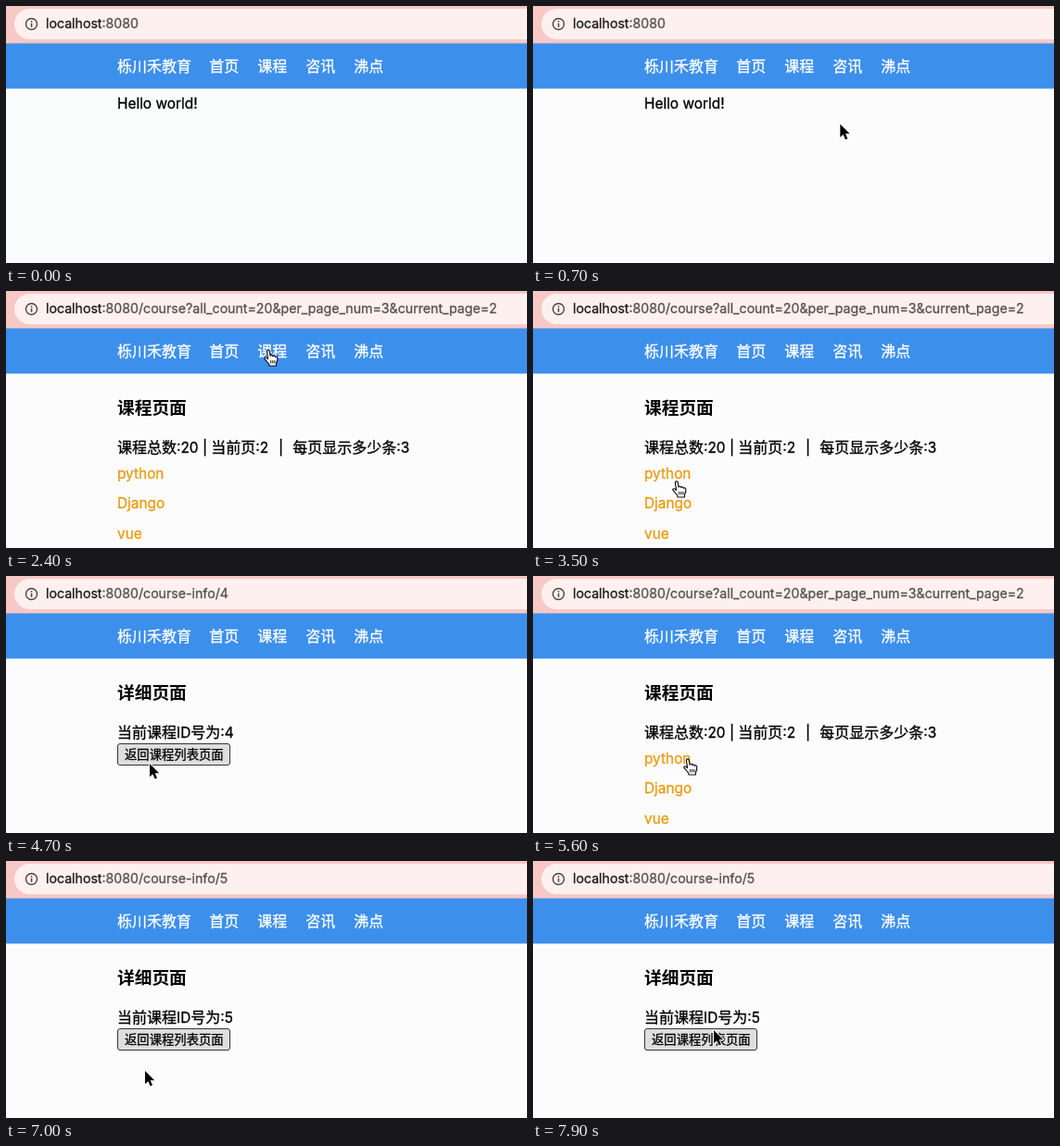
An HTML page with a canvas that plays this animation: 562x278 px, repeating every 8 s.

```html
<!DOCTYPE html>
<html lang="zh-CN">
<head>
<meta charset="utf-8">
<title>Router demo</title>
<style>
  html, body { margin: 0; width: 100%; height: 100%; overflow: hidden; background: #fcfcfc; }
  canvas { display: block; width: 562px; height: 278px; }
</style>
</head>
<body>
<canvas id="stage"></canvas>
<script>
const W = 562, H = 278, LOOP = 8000;
const LATIN = 'Inter, "Noto Sans CJK SC", "Noto Sans CJK", sans-serif';
const HAN = '"Noto Sans CJK SC", "Noto Sans CJK", sans-serif';
const LINK = '#ec9a10';

const canvas = document.getElementById('stage');
const ctx = canvas.getContext('2d');
const ratio = window.devicePixelRatio || 1;
canvas.width = W * ratio;
canvas.height = H * ratio;

// start time, page, path shown after the host
const pages = [
  [0, 'home', ''],
  [1900, 'list', '/course?all_count=20&per_page_num=3&current_page=2'],
  [3700, 'info', '/course-info/4'],
  [5500, 'list', '/course?all_count=20&per_page_num=3&current_page=2'],
  [6700, 'info', '/course-info/5']
];

// pointer tip: time, x, y
const track = [
  [300, 422, 237], [900, 300, 90], [1200, 283, 64], [2500, 283, 64],
  [3100, 163, 211], [3400, 155, 206], [3700, 155, 206], [4000, 155, 203],
  [5000, 155, 203], [5350, 167, 198], [6250, 167, 198], [6600, 150, 227],
  [7100, 150, 227], [7700, 195, 183], [8000, 195, 183]
];

const arrow = new Path2D('M0 0V14.2L3.3 11.2L5.6 16.6L8 15.6L5.7 10.3H10.2Z');
const hand = new Path2D(
  'M-1.6 1.2C-1.6 -.6 1 -.6 1.3 1.1L2.1 6.2C2.6 4.8 4.5 5 4.8 6.6' +
  'C5.5 5.5 7.2 5.9 7.4 7.3C8.4 6.4 9.7 7 9.8 8.4C10 11 9.6 12.6 8.6 14' +
  'L8.4 17H1.2L.7 15.2C-.8 13.6 -1.8 11.6 -3.8 9.7C-5 8.4 -3.6 7.2 -2.2 8.1L-.4 9.6Z');
const creases = new Path2D('M2.7 11V14.4M4.8 11V14.4M6.9 11V14.4');

// A hairline outline gives regular type its medium weight.
function text(str, x, y, color, size, font, weight = 400) {
  ctx.font = `${weight} ${size}px ${font}`;
  ctx.fillStyle = ctx.strokeStyle = color;
  ctx.fillText(str, x, y);
  if (weight === 400) {
    ctx.lineWidth = 0.3;
    ctx.lineJoin = 'round';
    ctx.strokeText(str, x, y);
  }
  return x + ctx.measureText(str).width;
}
const latin = (str, x, y, color = '#000') => text(str, x, y, color, 15.4, LATIN);
const han = (str, x, y, color = '#000') => text(str, x, y, color, 16, HAN);
const heading = str => text(str, 120, 133, '#000', 18.72, HAN, 700);

function box(x, y, w, h, r, fill, stroke) {
  ctx.beginPath();
  ctx.roundRect(x, y, w, h, r);
  ctx.fillStyle = fill;
  ctx.fill();
  if (stroke) {
    ctx.strokeStyle = stroke;
    ctx.lineWidth = 1;
    ctx.stroke();
  }
}

function drawChrome(path) {
  ctx.fillStyle = '#f7c8c5';
  ctx.fillRect(0, 0, W, 41);
  box(9, 3, W + 40, 33, 16.5, '#fdf0ee');

  ctx.strokeStyle = ctx.fillStyle = '#4a4444';
  ctx.lineWidth = 1.4;
  ctx.beginPath();
  ctx.arc(27.5, 19.5, 6, 0, Math.PI * 2);
  ctx.stroke();
  ctx.fillRect(26.8, 18.6, 1.5, 4.2);
  ctx.fillRect(26.8, 16, 1.5, 1.5);

  const x = text('localhost', 43, 24, '#1c1a1a', 14.17, LATIN);
  text(':8080' + path, x, 24, '#575151', 14.17, LATIN);

  ctx.fillStyle = '#3d8fec';
  ctx.fillRect(0, 40.4, W, 49);
  han('栎川禾教育', 120, 71, '#fff');
  ['首页', '课程', '咨讯', '沸点'].forEach((s, i) => han(s, 219.3 + i * 52, 71, '#fff'));
}

const views = {
  home() {
    latin('Hello world!', 120, 111);
  },
  list() {
    heading('课程页面');
    latin(':20', han('课程总数', 120, 175), 175);
    latin('|', 212, 175);
    latin(':2', han('当前页', 221.3, 175), 175);
    latin('|', 294, 175);
    latin(':3', han('每页显示多少条', 309.3, 175), 175);
    ['python', 'Django', 'vue'].forEach((s, i) => latin(s, 120, Math.round(203 + i * 32.4), LINK));
  },
  info(path) {
    heading('详细页面');
    let x = han('当前课程', 120, 175);
    x = latin('ID', x, 175);
    x = han('号为', x, 175);
    latin(':' + path.slice(-1), x, 175);
    box(120.5, 181.5, 121, 23, 2.5, '#dedede', '#333');
    text('返回课程列表页面', 128, 198, '#000', 13.33, HAN);
  }
};

function pointerAt(t) {
  const i = track.findIndex(k => k[0] > t);
  if (i < 1) return null;
  const [t0, x0, y0] = track[i - 1], [t1, x1, y1] = track[i];
  const u = (t - t0) / (t1 - t0), e = u * u * (3 - 2 * u);
  return [x0 + (x1 - x0) * e, y0 + (y1 - y0) * e];
}

function overLink(view, x, y) {
  if (y > 54 && y < 80) return x > 120 && x < 408;
  if (view !== 'list' || x < 120 || x > 172) return false;
  return (y > 186 && y < 209) || (y > 219 && y < 241);
}

function drawPointer(t, view) {
  const at = pointerAt(t);
  if (!at) return;
  ctx.save();
  ctx.translate(...at);
  ctx.lineJoin = 'round';
  if (overLink(view, ...at)) {
    ctx.fillStyle = '#fff';
    ctx.strokeStyle = '#111';
    ctx.lineWidth = 1.2;
    ctx.fill(hand);
    ctx.stroke(hand);
    ctx.lineWidth = 1;
    ctx.stroke(creases);
  } else {
    ctx.fillStyle = '#000';
    ctx.strokeStyle = '#fff';
    ctx.lineWidth = 2;
    ctx.stroke(arrow);
    ctx.fill(arrow);
  }
  ctx.restore();
}

function render(t) {
  const [, view, path] = pages.filter(p => p[0] <= t).pop();
  ctx.setTransform(ratio, 0, 0, ratio, 0, 0);
  ctx.fillStyle = t < 100 ? '#fafcfb' : '#fcfcfc';
  ctx.fillRect(0, 0, W, H);
  drawChrome(path);
  views[view](path);
  drawPointer(t, view);
}

const start = performance.now();
function tick() {
  render((performance.now() - start) % LOOP);
  requestAnimationFrame(tick);
}
tick();
</script>
</body>
</html>
```
